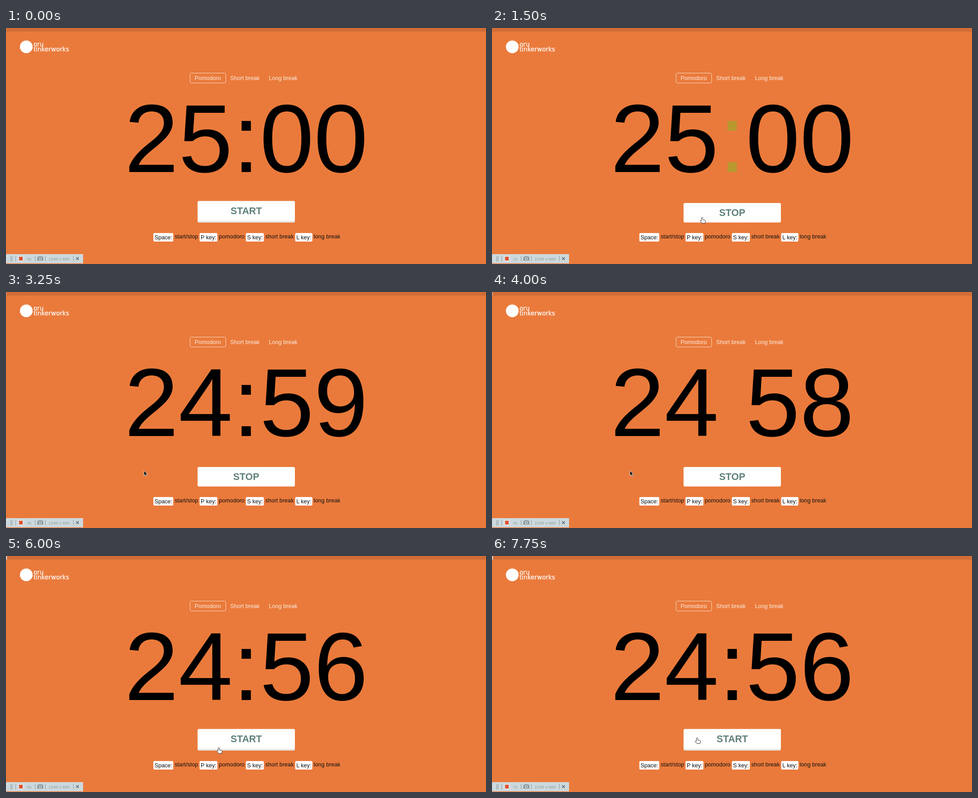
Recreate the animation shown at these times as an HTML page. Size 1065 by 526 pixels, loop 8000 ms.

```html
<!DOCTYPE html>
<html lang="en">
<head>
<meta charset="utf-8">
<title>Pomodoro timer</title>
<style>
  html, body { margin: 0; width: 100%; height: 100%; overflow: hidden; background: #ea7a3b; }
  svg { display: block; width: 1065px; height: 526px; font: 12.64px "Liberation Sans", Arial, sans-serif; }
  .brand { font: 13.6px "DejaVu Sans", sans-serif; fill: #fff; stroke: #fff; stroke-width: .25; }
  .tabs { fill: #fcece1; }
  .clock { font-size: 216px; }
  .button text { font-size: 21.4px; font-weight: bold; fill: #5f807a; text-anchor: middle; }
  .keys { fill: #111; }
  .recorder { font-size: 9.48px; fill: #969b9e; }
</style>
</head>
<body>
<svg viewBox="0 0 1065 526">
  <rect width="1065" height="526" fill="#ea7a3b"/>
  <rect width="1065" height="8" fill="#d16d35"/>
  <rect id="progress" height="8" fill="#d8d9d8"/>

  <g class="brand">
    <circle cx="45" cy="42" r="14"/>
    <text x="61" y="41">oru</text>
    <text x="61" y="52">tinkerworks</text>
  </g>

  <g class="tabs">
    <rect x="408.5" y="100.5" width="79" height="22" rx="3" fill="none" stroke="#f9dcc2"/>
    <text x="418.5" y="115.5">Pomodoro</text>
    <text x="497.5" y="115.5">Short break</text>
    <text x="583.5" y="115.5">Long break</text>
  </g>

  <g class="clock">
    <text id="minutes" x="262.7" y="321"></text>
    <text id="colon" x="502.9" y="321">:</text>
    <text id="seconds" x="562.9" y="321"></text>
  </g>

  <g class="button">
    <rect id="edge" x="425" y="395" width="216" height="38.5" rx="3" fill="#ebebeb"/>
    <rect id="face" x="425" width="216" rx="3" fill="#fff"/>
    <text id="action" x="533"></text>
  </g>

  <g class="keys" id="keys"></g>

  <g class="recorder">
    <rect y="504" width="171" height="20.5" fill="#cdd9de"/>
    <path d="M10.5 509v11M13.5 509v11" stroke="#687378" stroke-width="1.4" stroke-dasharray="1.2 1.3"/>
    <path d="M21.5 508v12M64.5 508v12M87.5 508v12M149.5 508v12" stroke="#8d989d"/>
    <rect x="27" y="508" width="12" height="12" fill="#dfe0df"/>
    <rect x="29" y="510" width="8" height="8" fill="#e0512e"/>
    <text id="elapsed" x="46.5" y="517.5"></text>
    <path d="M69.5 510h3l1-1.5h5l1 1.5h3v8.5h-13z" fill="#879297"/>
    <circle cx="76" cy="514" r="2.7" fill="#879297" stroke="#dbe4e7" stroke-width="1.3"/>
    <text x="94.5" y="517.5">1348 x 666</text>
    <path d="M155.5 511l6 6m0-6l-6 6" stroke="#4f5b61" stroke-width="1.4"/>
  </g>

  <g id="cursor">
    <path id="arrow" d="M0 0V11.5L2.6 9 4.6 13.2 6.5 12.3 4.6 8.2H8Z" fill="#111" stroke="#fff" stroke-width=".8"/>
    <path id="hand" d="M-1.5 1Q0-1 1.5 1V5L6 6.2Q8 7 7.5 9L6.5 13H0L-4.5 8.5Q-4 6.3-1.5 8Z" fill="#fff" stroke="#333" stroke-width="1"/>
  </g>
</svg>
<script>
const $ = id => document.getElementById(id);
const show = (id, visible) => $(id).setAttribute('visibility', visible ? 'visible' : 'hidden');
const set = (id, attrs) => { for (const k in attrs) $(id).setAttribute(k, attrs[k]); };

const LOOP = 8000, START = 1450, STOP = 5750;
const BLINK = 917, BLINK_END = 1575;

// Cursor tip: time, x, y
const track = [
  [250, 40, 498], [1250, 466, 422], [1600, 466, 422], [2250, 306, 398], [4800, 306, 398],
  [5200, 466, 428], [5400, 466, 428], [5650, 472, 427], [6100, 472, 427],
  [7000, 452, 410], [7250, 452, 410], [7700, 455, 405], [LOOP, 455, 405]
];

// Key name, box left, box width, meaning, meaning left
$('keys').innerHTML = [
  ['Space:', 327, 44, 'start/stop', 374.3], ['P key:', 429.5, 39.5, 'pomodoro', 472.3],
  ['S key:', 532.3, 39.7, 'short break', 575.3], ['L key:', 641.7, 38, 'long break', 682.8]
].map(([key, x, w, label, lx]) =>
  `<rect x="${x}" y="457" width="${w}" height="19" rx="2" fill="#fff"/>
   <text x="${x + 2.5}" y="471">${key}</text><text x="${lx}" y="468.5">${label}</text>`).join('');

function cursorAt(t) {
  const i = track.findIndex(p => p[0] > t);
  const [t0, x0, y0] = track[i - 1], [t1, x1, y1] = track[i];
  const u = (t - t0) / (t1 - t0), e = u * u * (3 - 2 * u);
  return [x0 + (x1 - x0) * e, y0 + (y1 - y0) * e];
}

function colonColor(t) {
  const left = BLINK - 1 - (t - BLINK_END + BLINK) % BLINK;
  return left < 100 ? '#b8992f' : left < 315 ? '#000' : 'none';
}

function draw(t) {
  const running = t >= START && t < STOP;
  const ticks = Math.max(0, Math.floor((Math.min(t, STOP) - START) / 1000));
  const remaining = 1500 - ticks;
  $('minutes').textContent = Math.floor(remaining / 60);
  $('seconds').textContent = String(remaining % 60).padStart(2, '0');
  set('colon', { fill: running ? colonColor(t) : '#000' });
  set('progress', { width: ticks * .55 });
  $('elapsed').textContent = Math.floor(t / 1000) + 's';

  show('edge', !running);
  set('face', { y: running ? 390 : 385.5, height: running ? 43.5 : 44 });
  set('action', { y: running ? 419.3 : 414.6 });
  $('action').textContent = running ? 'STOP' : 'START';

  const visible = t >= 250;
  const [x, y] = visible ? cursorAt(t) : [0, 0];
  const over = x > 425 && x < 641 && y > 385 && y < 434;
  set('cursor', { transform: `translate(${x} ${y})` });
  show('arrow', visible && !over);
  show('hand', visible && over);
}

const begin = performance.now();
function frame() {
  draw((performance.now() - begin) % LOOP);
  requestAnimationFrame(frame);
}
frame();
</script>
</body>
</html>
```
